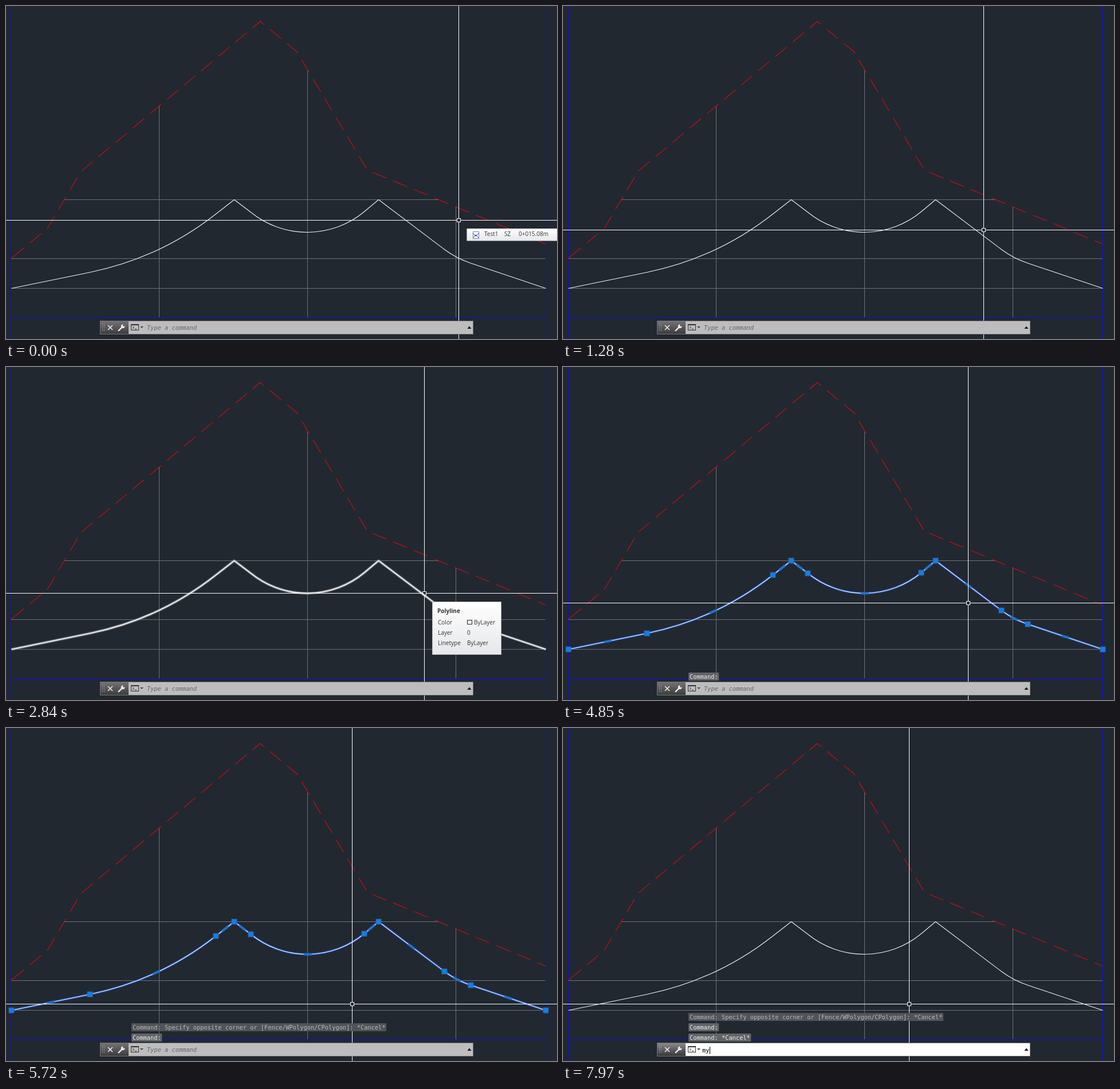
These frames come from a looping animation (962x582 px, 8 s). An HTML page:

```html
<!DOCTYPE html>
<html lang="en">
<head>
<meta charset="utf-8">
<style>
  html, body { margin: 0; width: 100%; height: 100%; overflow: hidden; background: #212830; }
  svg { display: block; }
  text { white-space: pre; }
  .thin { fill: none; stroke-width: 1; shape-rendering: crispEdges; }
  .line { fill: none; stroke-linejoin: round; }
  .tip { font: 10px "Open Sans", "Noto Sans", sans-serif; fill: #333; }
  .mono { font: 10.33px "DejaVu Sans Mono", monospace; }
  .bold { font-weight: bold; }
  .slant { font-style: italic; }
</style>
</head>
<body>
<svg width="962" height="582" viewBox="0 0 962 582">
  <defs>
    <path id="profile"/>
    <linearGradient id="idle" x2="0" y2="1"><stop stop-color="#747474"/><stop offset="1" stop-color="#3a3a3a"/></linearGradient>
    <linearGradient id="busy" x2="0" y2="1"><stop stop-color="#8c8c8c"/><stop offset="1" stop-color="#333"/></linearGradient>
    <linearGradient id="paper" x2="0" y2="1"><stop stop-color="#fff"/><stop offset="1" stop-color="#e6e7ea"/></linearGradient>
  </defs>

  <path class="thin" stroke="#6e7276" d="M267.5 175V544M526.5 113V544M785.5 350V544M102 338.5H755M9 441.5H942M9 493.5H942"/>
  <path class="line" stroke="#1212cc" stroke-width="1.3" d="M9 0V582M942.3 0V582M9 544.9H942"/>
  <g class="line" stroke="#d80a0e" stroke-width="1.1">
    <path d="M9 441L12 438.5"/>
    <path stroke-dasharray="26 13" d="M11.7 438.8L72 389L131 289L444 27L508 80L631 287L942 416"/>
  </g>

  <g id="hover" class="line">
    <use href="#profile" stroke="#8b9095" stroke-opacity=".5" stroke-width="5"/>
    <use href="#profile" stroke="#c8cacc" stroke-width="2.6"/>
  </g>
  <g id="glow" class="line">
    <use href="#profile" stroke="#1c4fb4" stroke-opacity=".5" stroke-width="4.6"/>
    <use href="#profile" stroke="#2c64d0" stroke-width="2.4"/>
  </g>
  <use href="#profile" class="line" stroke="#f0f0f0" stroke-width="1.1"/>
  <g id="grips"></g>

  <g id="cross" class="thin" stroke="#fff">
    <path d="M-1000 0H-3M3 0H1000M0 -600V-3M0 3V600"/>
    <rect x="-3" y="-3" width="6" height="6"/>
  </g>

  <g id="label" class="tip">
    <rect x="804.5" y="389" width="158" height="21.5" fill="url(#paper)"/>
    <rect x="815.5" y="394.5" width="10" height="12" fill="#fff" stroke="#7b86b8"/>
    <path d="M815 397L820 402L826 397M816 405L820 400L825 405" fill="none" stroke="#2238a8"/>
    <text x="835" y="402">Test1</text><text x="870" y="402">SZ</text><text x="895" y="402">0+015.08m</text>
  </g>

  <g id="info" class="tip">
    <rect x="744" y="410" width="121" height="93" fill="url(#paper)"/>
    <rect x="744.5" y="410.5" width="120" height="92" fill="none" stroke="#b4b6b8"/>
    <text class="bold" x="753" y="430">Polyline</text>
    <text x="754" y="450">Color</text><text x="817" y="450">ByLayer</text>
    <text x="754" y="468">Layer</text><text x="805" y="468">0</text>
    <text x="754" y="486">Linetype</text><text x="805" y="486">ByLayer</text>
    <rect x="805.5" y="442.5" width="8" height="7" fill="#fff" stroke="#222"/>
  </g>

  <g id="history" class="mono"></g>

  <g>
    <rect id="handle" x="164" y="550" width="50" height="24"/>
    <rect id="field" x="214" y="550" width="602" height="24"/>
    <rect class="thin" x="164.5" y="550.5" width="651" height="23" stroke="#777"/>
    <path d="M168.5 555V570M171.5 555V570" stroke="#bbb" stroke-dasharray="1 2"/>
    <path d="M178 558L186 566M186 558L178 566" stroke="#eee" stroke-width="1.6"/>
    <path d="M196 568L203 561" stroke="#eee" stroke-width="2.4"/>
    <path d="M207.5 559.5A3.4 3.4 0 1 1 204.5 556.5L204 560Z" fill="#eee"/>
    <rect class="thin" x="218.5" y="556.5" width="13" height="10" stroke="#333"/>
    <path class="thin" d="M218 557.5H232" stroke="#333"/>
    <path d="M221 560L223.5 562L221 564M225 564.5H228" fill="none" stroke="#333"/>
    <path d="M234 560H240L237 563Z" fill="#444"/>
    <path d="M805.5 564L809 559.5L812.5 564Z" fill="#111"/>
    <text id="prompt" class="mono slant" x="246" y="565.5" fill="#666">Type a command</text>
    <text id="typed" class="mono" x="243" y="567"></text>
    <path id="caret" class="thin" stroke="#000" d="M.5 557V570"/>
  </g>
</svg>
<script>
const $ = id => document.getElementById(id);
const show = (id, on) => $(id).style.display = on ? '' : 'none';
const CHAR = 6.22, TICK = 76;

// Profile vertices; a radius makes the stretch leading to that vertex an arc
const profile = [
  { x: 9, y: 493 }, { x: 146, y: 465 }, { x: 366, y: 363, r: 527 }, { x: 398, y: 338 }, { x: 427, y: 360 },
  { x: 625, y: 359, r: 156 }, { x: 650, y: 338 }, { x: 765, y: 425 }, { x: 811, y: 449, r: 161 }, { x: 942, y: 493 }
];

function buildProfile() {
  let path = '', bars = '', squares = '';
  profile.forEach(({ x, y, r }, i) => {
    path += (i ? r ? `A${r} ${r} 0 0 0 ` : 'L' : 'M') + `${x} ${y}`;
    squares += `<rect x="${x - 4.5}" y="${y - 4.5}" width="9" height="9" fill="#0a80f5" stroke="#3c5f84"/>`;
    if (!i) return;
    const from = profile[i - 1], dx = x - from.x, dy = y - from.y, chord = Math.hypot(dx, dy);
    const sag = r ? r - Math.sqrt(r * r - chord * chord / 4) : 0;
    const angle = Math.atan2(dy, dx) * 180 / Math.PI;
    bars += `<rect x="-7" y="-2" width="14" height="4" fill="#1d74cc"
      transform="translate(${from.x + dx / 2} ${from.y + dy / 2}) rotate(${angle}) translate(0 ${sag})"/>`;
  });
  $('profile').setAttribute('d', path);
  $('grips').innerHTML = bars + squares;
  for (const id of ['profile', 'grips']) $(id).setAttribute('transform', 'translate(.5 .5)');
}
buildProfile();

// Cursor moves in steps from the previous place to x, y
const moves = [
  { start: 640, end: 980, x: 739, y: 383 },
  { start: 980, end: 1280, x: 734, y: 391 },
  { start: 1600, end: 1740, x: 730, y: 395 },
  { start: 4000, end: 4000, x: 728, y: 395 },
  { start: 4630, end: 5160, x: 654, y: 455 },
  { start: 5160, end: 5390, x: 604, y: 482 }
];

function cursor(t) {
  let x = 790, y = 374;
  for (const m of moves) {
    if (t < m.start) break;
    const p = t >= m.end ? 1 : Math.floor((t - m.start) / TICK) * TICK / (m.end - m.start);
    x += (m.x - x) * p;
    y += (m.y - y) * p;
  }
  return [Math.round(x), Math.round(y)];
}

const opposite = 'Command: Specify opposite corner or [Fence/WPolygon/CPolygon]: *Cancel*';
function historyAt(t) {
  if (t < 3450) return [];
  if (t < 5710) return ['Command:'];
  return t < 5950 ? [opposite, 'Command:'] : [opposite, 'Command:', 'Command: *Cancel*'];
}

let shown = 0;
function drawHistory(lines) {
  if (lines.length === shown) return;
  shown = lines.length;
  $('history').innerHTML = lines.map((line, i) => {
    const y = 545 - 18 * (lines.length - 1 - i);
    const old = line === opposite;
    return `<rect x="219" y="${y - 11}" width="${line.length * CHAR + 3.5}" height="14" rx="1" fill="${old ? '#515456' : '#626466'}"/>
      <text x="221" y="${y}" fill="${old ? '#b8b8b8' : '#f0f0f0'}">${line}</text>`;
  }).join('');
}

// Fade progress that rises in a fixed count of equal steps
const steps = (t, start, count) => Math.max(0, Math.min(count, Math.floor((t - start) / TICK) + 1)) / count;

function draw(now) {
  const t = now % 8000;
  const [x, y] = cursor(t);
  $('cross').setAttribute('transform', `translate(${x + .5} ${y + .5})`);

  const selected = t >= 3450 && t < 5950;
  show('label', t < 640);
  show('hover', t >= 1600 && t < 3450);
  show('glow', selected);
  show('grips', selected);
  $('info').style.opacity = steps(t, 2350, 7) - steps(t, 3450, 6);
  drawHistory(historyAt(t));

  const active = t >= 7500;
  const word = t >= 7970 ? 'my' : t >= 7590 ? 'm' : '';
  $('handle').setAttribute('fill', active ? 'url(#busy)' : 'url(#idle)');
  $('field').setAttribute('fill', active ? '#fff' : '#bdbdbd');
  show('prompt', !active);
  show('caret', active);
  $('typed').textContent = word;
  $('caret').setAttribute('transform', `translate(${243 + Math.round(word.length * 6.4)} 0)`);
  requestAnimationFrame(draw);
}
requestAnimationFrame(draw);
</script>
</body>
</html>
```
